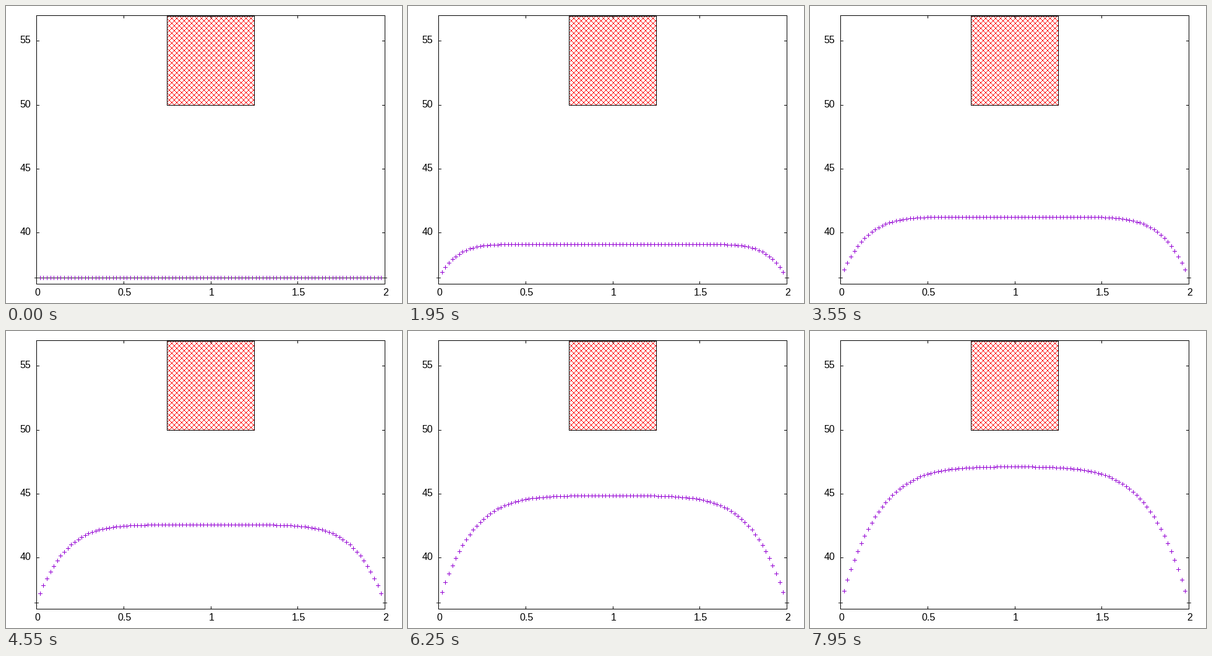
Animation of 640x480 px, one loop 8000 ms. Source, as a matplotlib script:

```python
import math
import numpy as np
import matplotlib.pyplot as plt
from matplotlib.animation import FuncAnimation
from matplotlib.collections import LineCollection

W, H, DPI = 640, 480, 100
LEFT, RIGHT, TOP, BOTTOM = 49, 612, 15, 449
FRAMES, STEP = 160, 50
BASE_Y = 438.75          # pixel row of the fixed boundary temperature
RISE = 23.5 / 17         # heating per frame, in pixels
DIFF = 0.25 ** 2 / 159   # diffusivity per frame
PURPLE, DARK = "#9400d3", "#262626"

fig = plt.figure(figsize=(W / DPI, H / DPI), dpi=DPI, facecolor="white")
ax = fig.add_axes([0, 0, 1, 1])
ax.set_xlim(0, W)
ax.set_ylim(H, 0)
ax.axis("off")


def hseg(x0, x1, y):
    """Pixel row y from column x0 to x1, both included."""
    return [(x0, y + 0.5), (x1 + 1, y + 0.5)]


def vseg(x, y0, y1):
    return [(x + 0.5, y0), (x + 0.5, y1 + 1)]


def strokes(segs, color, z):
    lines = LineCollection(segs, colors=color, linewidths=72 / DPI,
                           capstyle="butt", zorder=z)
    lines.set_snap(False)
    ax.add_collection(lines, autolim=False)
    return lines


def box(x0, x1, y0, y1):
    return [hseg(x0, x1, y0), hseg(x0, x1, y1),
            vseg(x0, y0, y1), vseg(x1, y0, y1)]


def label(x, y, text, align):
    ax.text(x, y, text, ha=align, va="baseline", family="Liberation Sans",
            size=16 * 72 / DPI, color="black", zorder=5)


def hatch(x0, x1, y0, y1):
    """Crosshatch repeating every 8 pixels."""
    row, col = np.mgrid[y0:y1, x0:x1] % 8
    img = np.ones((y1 - y0, x1 - x0, 3))
    img[(row == col) | (row + col == 7)] = (1, 0, 0)
    ax.imshow(img, extent=(x0, x1, y1, y0), interpolation="nearest",
              aspect="auto", zorder=1)
    ax.set_xlim(0, W)
    ax.set_ylim(H, 0)


hatch(261, 401, 17, 160)
strokes(box(260, 401, 16, 160), "black", 2)

frame_lines = box(LEFT, RIGHT, TOP, BOTTOM)
for value in (40, 45, 50, 55):
    y = round(BOTTOM - (value - 36) * (BOTTOM - TOP) / 21)
    frame_lines += [hseg(LEFT, LEFT + 4, y), hseg(RIGHT - 4, RIGHT, y)]
    label(40.2, y + 4, str(value), "right")
for value in (0, 0.5, 1, 1.5, 2):
    x = math.floor(LEFT + value * (RIGHT - LEFT) / 2 + 0.5)
    frame_lines += [vseg(x, BOTTOM - 4, BOTTOM), vseg(x, TOP, TOP + 4)]
    label(x + 1.5, 468, f"{value:g}", "center")
strokes(frame_lines, "black", 4)

# the two end points never move
end_y = round(BASE_Y)
strokes([hseg(x - 3, x + 3, end_y) for x in (LEFT, RIGHT)], DARK, 3)

pos = np.arange(1, 100) * 0.02
cols = np.floor(LEFT + pos * (RIGHT - LEFT) / 2 + 0.5).astype(int)
rows = strokes([], PURPLE, 3)
stems = strokes([], PURPLE, 3.1)


def loss(dist, n):
    """Share of the heating lost through a wall at the given distance."""
    z = dist / (2 * math.sqrt(DIFF * n))
    return ((1 + 2 * z * z) * math.erfc(z)
            - 2 / math.sqrt(math.pi) * z * math.exp(-z * z))


def heights(n):
    if n == 0:
        return np.full(len(pos), end_y)
    share = np.array([1 - loss(p, n) - loss(2 - p, n) for p in pos])
    return np.floor(BASE_Y - RISE * n * share + 0.5).astype(int)


def draw(n):
    ys = heights(n)
    rows.set_segments([hseg(x - 3, x + 3, y) for x, y in zip(cols, ys)])
    rows.set_color(DARK if n == 0 else PURPLE)
    stems.set_segments([vseg(x, y - 3, y + 3) for x, y in zip(cols, ys)])
    return rows, stems


anim = FuncAnimation(fig, draw, frames=FRAMES, interval=STEP,
                     repeat=True, repeat_delay=0, blit=False)
plt.show()
```
